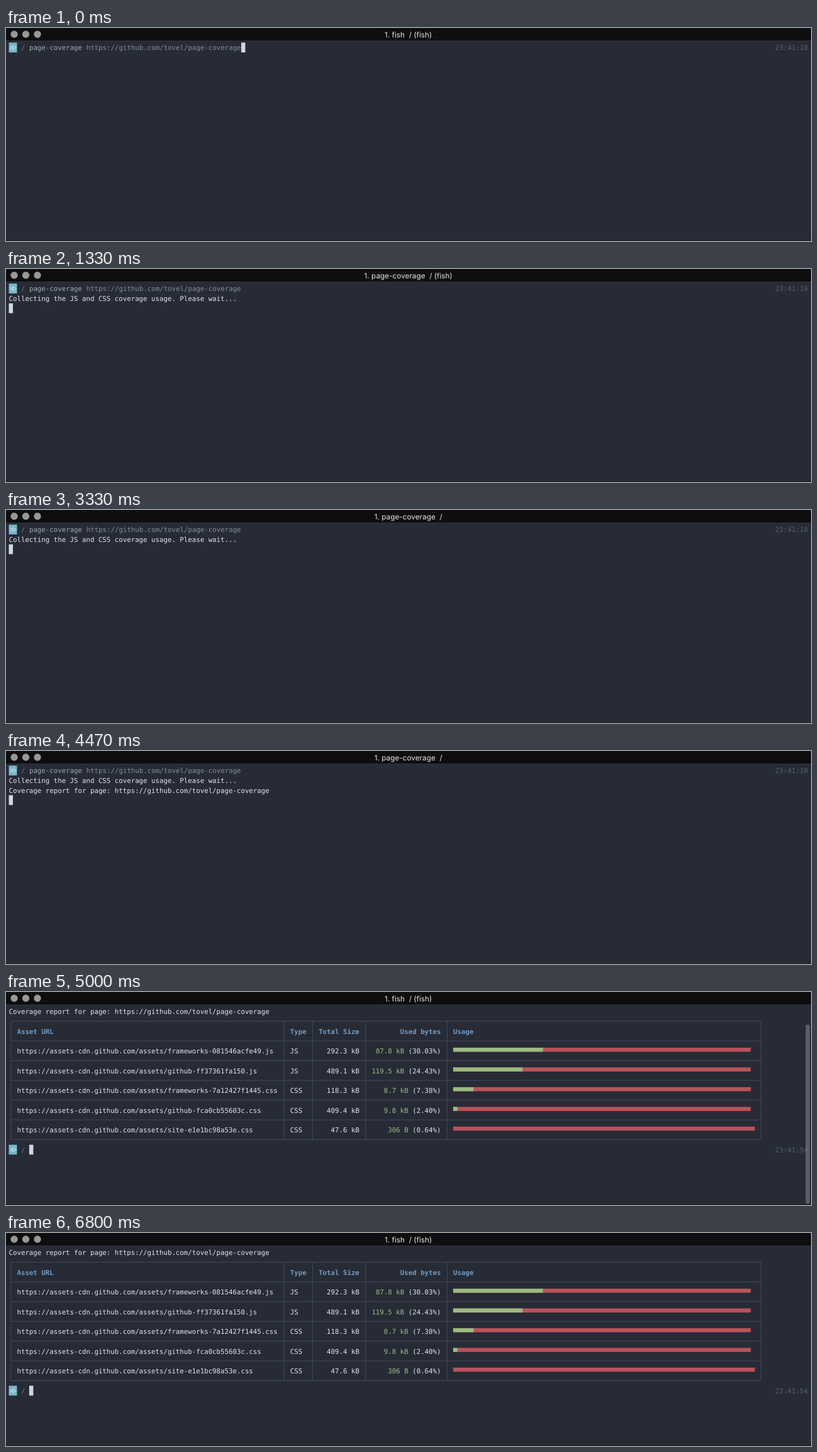
These frames come from a looping animation (1280 px wide and 340 px high, 6870 ms). An HTML page:

```html
<!DOCTYPE html>
<html lang="en">
<head>
<meta charset="utf-8">
<title>page-coverage</title>
<style>
  html, body { margin: 0; width: 100%; height: 100%; overflow: hidden; background: #1b1c26; }
  svg { display: block; width: 1280px; height: 340px; }
  text { font: 10.767px "DejaVu Sans Mono", monospace; white-space: pre; text-rendering: geometricPrecision; }
  .bold { font-weight: bold; }
  #title { font: 11.8px Inter, sans-serif; fill: #e4e4e4; text-anchor: middle; }
</style>
</head>
<body>
<svg viewBox="0 0 1280 340">
  <rect y="4" width="1280" height="335" rx="4" fill="#272b36"/>
  <path d="M0 20V5Q0 0 5 0H1275Q1280 0 1280 5V20Z" fill="#0e0d0f"/>
  <path d="M0 20.5H1280" stroke="#30323a"/>
  <g fill="#989898">
    <circle cx="13" cy="10" r="5.7"/>
    <circle cx="31.5" cy="10" r="5.7"/>
    <circle cx="50" cy="10" r="5.7"/>
  </g>
  <text id="title" x="639.7" y="14.6"></text>
  <g id="command"></g>
  <g id="waiting"></g>
  <g id="heading"></g>
  <g id="report"></g>
  <rect id="cursor" width="6.5" height="15.7" fill="#d0d7e3"/>
  <rect id="scroll" x="1271.5" y="52" width="6.5" height="286" rx="3.2" fill="#74777c"/>
</svg>
<script>
const LOOP = 6870, CW = 6.482, LH = 15.75;
const FG = '#dfe5ee', BLUE = '#739ac0', GREEN = '#9bba80', RED = '#ba525a',
      CYAN = '#75b6ca', LINE = '#434a59', DIM = '#56616e';
const PAGE = 'https://github.com/tovel/page-coverage';
const ASSETS = 'https://assets-cdn.github.com/assets/';

const $ = id => document.getElementById(id);
const px = col => 4.5 + col * CW;
const py = row => 23.3 + row * LH;

function add(parent, tag, attrs, text = '') {
  const el = document.createElementNS('http://www.w3.org/2000/svg', tag);
  for (const key in attrs) el.setAttribute(key, attrs[key]);
  el.textContent = text;
  return parent.appendChild(el);
}
const write = (g, col, row, text, fill = FG, cls = '') =>
  add(g, 'text', { x: px(col), y: py(row) + 11.9, fill, class: cls }, text);
const writeRight = (g, col, row, text, ...style) =>
  write(g, col - text.length, row, text, ...style);
const bar = (g, col, row, cells, fill) =>
  add(g, 'rect', { x: px(col), y: py(row) + 2.6, width: cells * CW, height: 6.5, fill });

function prompt(g, row, time) {
  const y = py(row);
  add(g, 'rect', { x: px(0), y, width: 2 * CW, height: 15.7, fill: CYAN });
  add(g, 'path', {
    d: `M6 ${y + 5}l5 6m-5 0l5 -6v6M11.5 ${y + 5}l5 3l-5 3`,
    fill: 'none', stroke: '#d5e6ec', 'stroke-width': .9
  });
  write(g, 3, row, '/', '#6a7c88');
  write(g, 188, row, time, DIM);
}

function table(g) {
  const top = py(1) + 7.6, left = px(.5), right = px(184.5);
  let d = '';
  for (let i = 0; i < 7; i++) d += `M${left} ${top + i * 2 * LH}H${right}`;
  for (const col of [0, 67, 74, 87, 107, 184]) d += `M${px(col + .5)} ${top}v${12 * LH}`;
  add(g, 'path', { d, stroke: LINE, fill: 'none' });

  write(g, 2, 2, 'Asset URL', BLUE, 'bold');
  write(g, 69, 2, 'Type', BLUE, 'bold');
  write(g, 76, 2, 'Total Size', BLUE, 'bold');
  write(g, 96, 2, 'Used bytes', BLUE, 'bold');
  write(g, 109, 2, 'Usage', BLUE, 'bold');

  // file, total, used, share, green cells, all cells
  [
    ['frameworks-081546acfe49.js', '292.3 kB', '87.8 kB', '30.03', 22, 73],
    ['github-ff37361fa150.js', '489.1 kB', '119.5 kB', '24.43', 17, 73],
    ['frameworks-7a12427f1445.css', '118.3 kB', '8.7 kB', '7.38', 5, 73],
    ['github-fca0cb55603c.css', '409.4 kB', '9.8 kB', '2.40', 1, 73],
    ['site-e1e1bc98a53e.css', '47.6 kB', '306 B', '0.64', 0, 74]
  ].forEach(([file, total, used, share, green, cells], i) => {
    const row = 4 + 2 * i, percent = `(${share}%)`;
    write(g, 2, row, ASSETS + file);
    write(g, 69, row, file.split('.').pop().toUpperCase());
    writeRight(g, 86, row, total);
    writeRight(g, 106, row, percent);
    writeRight(g, 105 - percent.length, row, used, GREEN);
    bar(g, 109, row, cells, RED);
    bar(g, 109, row, green, GREEN);
  });
}

prompt($('command'), 0, '23:41:10');
write($('command'), 5, 0, 'page-coverage', '#a0a9b5');
write($('command'), 19, 0, PAGE, '#838d99');
write($('waiting'), 0, 1, 'Collecting the JS and CSS coverage usage. Please wait...');
write($('heading'), 0, 2, 'Coverage report for page: ' + PAGE);
table($('report'));
prompt($('report'), 14, '23:41:54');

// Latest value whose start time has passed
const at = (t, steps) => steps.filter(s => t >= s[0]).pop()[1];
const show = (id, on) => $(id).style.display = on ? '' : 'none';

function draw(t) {
  const done = t >= 4530;
  $('title').textContent = at(t, [
    [0, '1. fish  / (fish)'], [730, '1. page-coverage  / (fish)'],
    [2730, '1. page-coverage  /'], [4530, '1. fish  /'], [4600, '1. fish  / (fish)']
  ]);
  show('command', !done);
  show('waiting', t >= 1270 && !done);
  show('heading', t >= 4470);
  $('heading').setAttribute('transform', `translate(0 ${done ? -2 * LH : 0})`);
  show('report', done);

  const [col, row] = at(t, [
    [0, [57, 0]], [800, [0, 1]], [1270, [0, 2]], [4470, [0, 3]], [4530, [5, 14]]
  ]);
  $('cursor').setAttribute('x', px(col));
  $('cursor').setAttribute('y', py(row));
  $('scroll').style.opacity = at(t, [[0, 0], [4530, 1], [5000, .7], [5070, .35], [5130, 0]]);
}

const start = performance.now();
function tick() {
  draw((performance.now() - start) % LOOP);
  requestAnimationFrame(tick);
}
tick();
</script>
</body>
</html>
```
